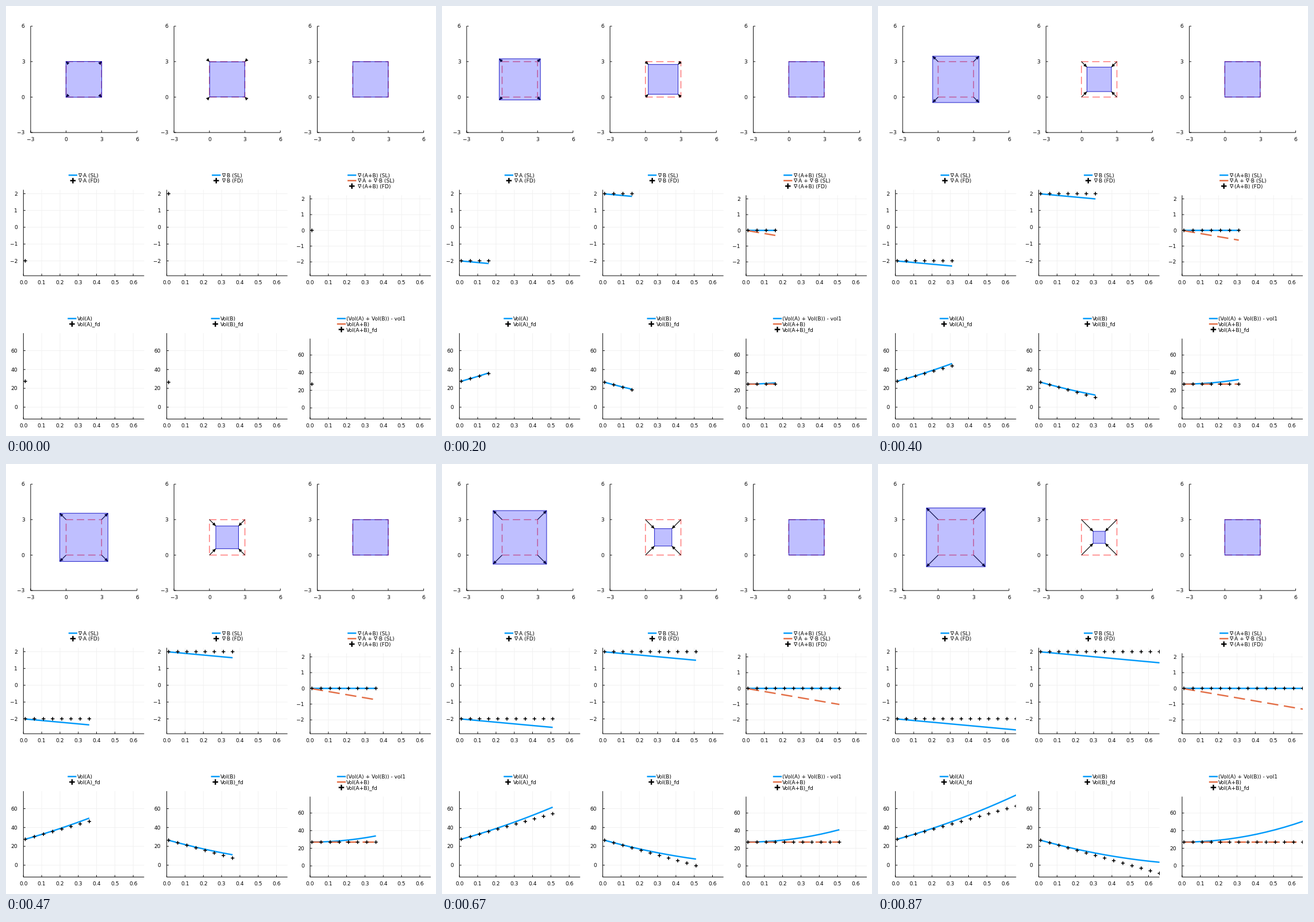
Write a matplotlib script that moves like this. It is 748 px wide and 748 px high and loops after 0.94 s.

```python
import numpy as np
import matplotlib.pyplot as plt
from matplotlib.animation import FuncAnimation
from matplotlib.patches import Polygon, Rectangle

SIZE = 748
COL = SIZE / 3
PX = 0.72  # points per pixel at 100 dpi
EM = 9.1
BLUE, ORANGE = "#009afa", "#e36f47"
STEPS, TICK_MS, TICKS = 14, 10, 94

plt.rcParams["font.family"] = "DejaVu Sans"
plt.rcParams["path.snap"] = False  # keep sub-pixel positions
fig = plt.figure(figsize=(SIZE / 100, SIZE / 100), dpi=100, facecolor="white")
ax = fig.add_axes([0, 0, 1, 1])
ax.set_xlim(0, SIZE)
ax.set_ylim(SIZE, 0)
ax.axis("off")


def line(xs, ys, color="black", width=1.0, **kw):
    kw.setdefault("solid_capstyle", "butt")
    kw.setdefault("dash_capstyle", "butt")
    return ax.plot(xs, ys, color=color, lw=width * PX, **kw)[0]


def crosses(xs, ys, size):
    """Plus signs as one broken line."""
    xs, ys = np.atleast_1d(xs)[:, None], np.atleast_1d(ys)[:, None]
    r, gap = size / 2, np.nan
    return ((xs + [-r, r, gap, 0, 0, gap]).ravel(),
            (ys + [0, 0, gap, -r, r, gap]).ravel())


def label(x, y, text, ha="left"):
    ax.text(x, y + 3.3, text, fontsize=EM * PX, ha=ha, va="baseline")


def number(v, digits=0):
    return f"{v:.{digits}f}".replace("-", "\u2212")


class Panel:
    """Plot area in pixels with linear scales and inward ticks."""

    def __init__(self, left, right, top, bottom, x_map, y_map):
        self.left, self.right, self.top, self.bottom = left, right, top, bottom
        self.x_map, self.y_map = x_map, y_map

    def x(self, v):
        return self.x_map[0] + self.x_map[1] * np.asarray(v)

    def y(self, v):
        return self.y_map[0] - self.y_map[1] * np.asarray(v)

    def axes(self, xticks, yticks, digits, grid):
        for v in xticks:
            px = self.x(v)
            if grid:
                line([px, px], [self.top, self.bottom], "#f0f0f0", 0.9, zorder=0)
            line([px, px], [self.bottom, self.bottom - 3.5], width=0.9)
            label(px, self.bottom + 11.6, number(v, digits), "center")
        for v in yticks:
            py = self.y(v)
            if grid:
                line([self.left, self.right], [py, py], "#f0f0f0", 0.9, zorder=0)
            line([self.left, self.left + 3.5], [py, py], width=0.9)
            label(self.left - 10.2, py, number(v), "right")
        line([self.left, self.left, self.right],
             [self.top, self.bottom, self.bottom], width=0.95, zorder=1)

    def clip(self, artist):
        box = Rectangle((self.left, self.top), self.right - self.left,
                        self.bottom - self.top, transform=ax.transData)
        artist.set_clip_path(box)


class Square:
    """Square with edge 3 whose corners move outwards by 1.5 * sign * t."""

    CORNERS = np.array([[0, 0], [3, 0], [3, 3], [0, 3]], float)
    OUT = np.array([[-1, -1], [1, -1], [1, 1], [-1, 1]], float)

    def __init__(self, col, sign):
        left, bottom, unit = 42.9 + col * COL, 220.1, 185 / 9
        self.sign = sign
        self.panel = Panel(left, left + 185, bottom - 185, bottom,
                           (left + 3 * unit, unit), (bottom - 3 * unit, unit))
        self.panel.axes((-3, 0, 3, 6), (-3, 0, 3, 6), 0, False)
        self.base = self.pixels(self.CORNERS)
        ring = np.vstack([self.base, self.base[:1]])
        line(*ring.T, "red", 1.6, alpha=0.5, zorder=2,
             dashes=(8, 4), dash_joinstyle="miter")
        self.fill = Polygon(self.base, fc=(0, 0, 1, 0.25), ec=(0, 0, 0.75, 0.85),
                            lw=PX, joinstyle="miter", zorder=4)
        ax.add_patch(self.fill)
        self.shafts, self.heads = [], []
        if sign:
            for p in self.base:
                self.shafts.append(line([], [], width=1.15, zorder=3))
                head = Polygon([p, p, p], fc="black", ec="none", zorder=3)
                self.heads.append(ax.add_patch(head))

    def pixels(self, pts):
        return np.column_stack([self.panel.x(pts[:, 0]), self.panel.y(pts[:, 1])])

    def update(self, t):
        tips = self.pixels(self.CORNERS + 1.5 * self.sign * t * self.OUT)
        self.fill.set_xy(tips)
        for start, tip, shaft, head in zip(self.base, tips, self.shafts, self.heads):
            way = (tip - start) / np.hypot(*(tip - start))
            side = np.array([-way[1], way[0]]) * 2.8
            back = tip - 6 * way
            shaft.set_data(*np.array([start, tip]).T)
            head.set_xy([tip, back + side, back - side])


class Chart:
    """Growing curves plus cross markers, with a legend above."""

    def __init__(self, col, top, bottom, y_map, yticks, curves, marks, legend):
        left = 30.3 + col * COL
        self.panel = Panel(left, left + 210, top, bottom, (left, 318.2), y_map)
        self.panel.axes(np.arange(7) / 10, yticks, 1, True)
        self.curves, self.marks = curves, marks
        self.lines = []
        for i in range(len(curves)):
            style = {"dashes": (8, 4)} if i else {}
            self.lines.append(line([], [], (BLUE, ORANGE)[i], 2.45, zorder=3, **style))
        self.points = line([], [], width=1.5, zorder=5)
        for artist in self.lines + [self.points]:
            self.panel.clip(artist)
        self.legend(*legend)

    def legend(self, x, y, names):
        for i, name in enumerate(names):
            row = y + 9.5 * i
            if i < len(names) - 1:
                line([x, x + 15.2], [row, row], (BLUE, ORANGE)[i], 2.45)
            else:
                line(*crosses(x + 7.6, row, 9.5), width=2.4)
            label(x + 16.6, row, name)

    def update(self, ts):
        xs = self.panel.x(ts)
        for curve, art in zip(self.curves, self.lines):
            art.set_data(xs, self.panel.y(curve(ts)))
        self.points.set_data(*crosses(xs, self.panel.y(self.marks(ts)), 6.3))


squares = [Square(0, 1), Square(1, -1), Square(2, 0)]

DIV, VOL = (-2, -1, 0, 1, 2), (0, 20, 40, 60)
charts = [
    Chart(0, 319.7, 469.2, (384.9, 29.2), DIV,
          [lambda t: -2 - t], lambda t: -2 + 0 * t,
          (108.8, 294.3, ["∇·A (SL)", "∇·A (FD)"])),
    Chart(1, 319.7, 469.2, (384.9, 29.2), DIV,
          [lambda t: 2 - t], lambda t: 2 + 0 * t,
          (358.1, 294.3, ["∇·B (SL)", "∇·B (FD)"])),
    Chart(2, 329.3, 469.2, (390.3, 27.4), DIV,
          [lambda t: 0 * t, lambda t: -2 * t], lambda t: 0 * t,
          (594.1, 294.3, ["∇·(A+B) (SL)", "∇·A + ∇·B (SL)", "∇·(A+B) (FD)"])),
    Chart(0, 569.1, 718.5, (697.9, 1.64), VOL,
          [lambda t: 27 * (1 + t) ** 2], lambda t: 27 + 54 * t,
          (107.3, 543.7, ["Vol(A)", "Vol(A)_fd"])),
    Chart(1, 569.1, 718.5, (697.9, 1.64), VOL,
          [lambda t: 27 * (1 - t) ** 2], lambda t: 27 - 54 * t,
          (356.6, 543.7, ["Vol(B)", "Vol(B)_fd"])),
    Chart(2, 578.6, 718.5, (699.1, 1.533), VOL,
          [lambda t: 27 + 54 * t ** 2, lambda t: 27 + 0 * t], lambda t: 27 + 0 * t,
          (575.8, 543.7, ["(Vol(A) + Vol(B)) - vol1", "Vol(A+B)", "Vol(A+B)_fd"])),
]


def draw(tick):
    # 15 steps per second, rounded to 10 ms; the last step is held
    step = min((3 * tick + 1) // 20, STEPS - 1)
    ts = 0.01 + 0.05 * np.arange(step + 1)
    for square in squares:
        square.update(ts[-1])
    for chart in charts:
        chart.update(ts)
    return []


anim = FuncAnimation(fig, draw, frames=TICKS, interval=TICK_MS,
                     repeat=True, repeat_delay=0, blit=False)
plt.show()
```
